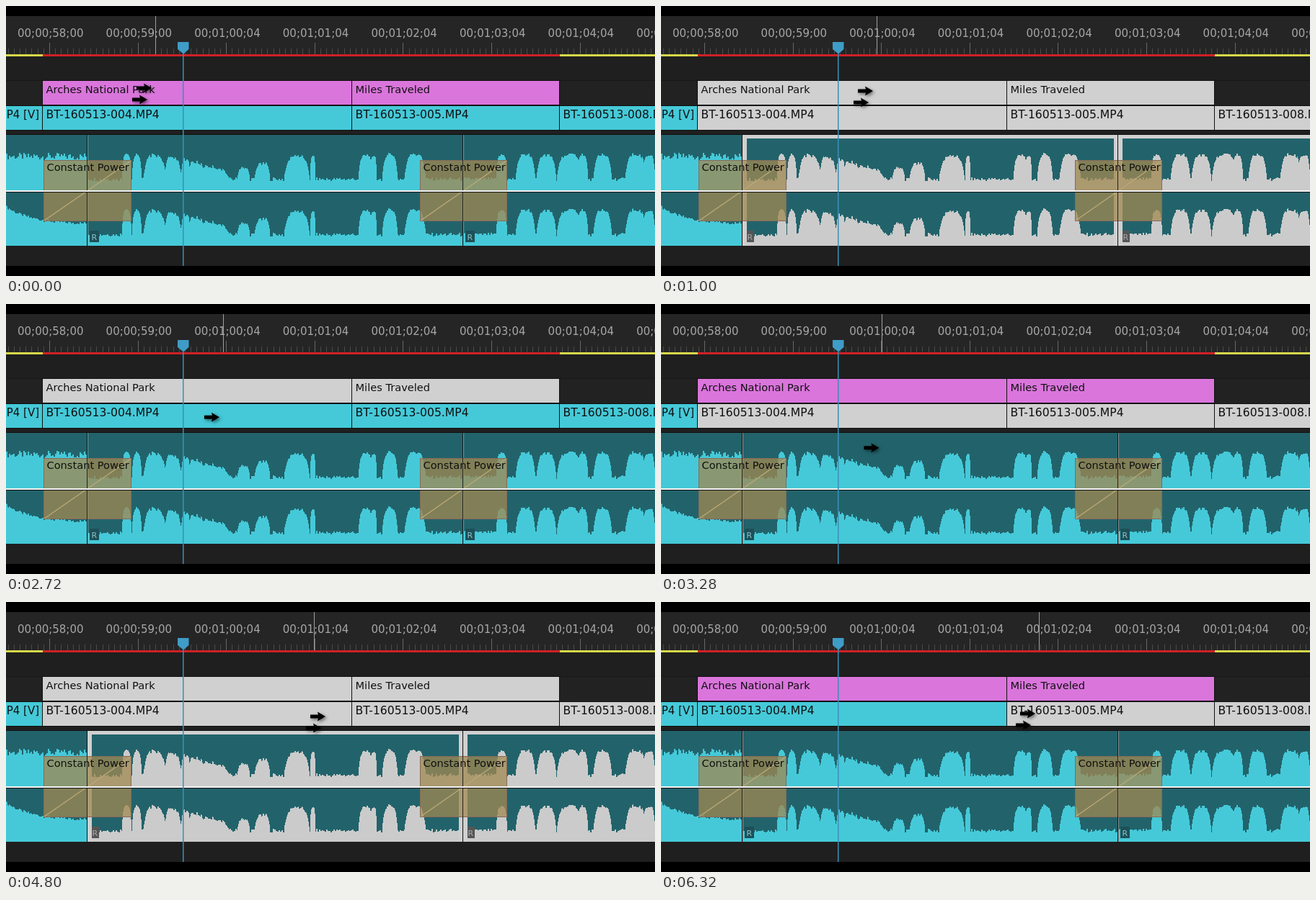
Recreate the animation shown at these times as an HTML page with a canvas. Size 900 px wide and 375 px high, loop 6.4 s.

```html
<!DOCTYPE html>
<html lang="en">
<head>
<meta charset="utf-8">
<title>Track select forward</title>
<style>
  html, body { margin: 0; width: 100%; height: 100%; overflow: hidden; background: #000; }
  canvas { display: block; }
</style>
</head>
<body>
<canvas id="stage" width="900" height="375"></canvas>
<script>
const ctx = document.getElementById('stage').getContext('2d');
const LOOP = 6400, STEP = 40;
const CYAN = '#45c9d8', PINK = '#da75dc', GREY = '#d0d0d0', TEAL = '#22636b', INK = '#101010';

// Pointer moves: start, end, x, y
const moves = [
  [40, 640, 294, 126], [2500, 2740, 296, 158], [3080, 3360, 304, 210],
  [3760, 4280, 359, 179], [4560, 5040, 527, 155], [5600, 5680, 519, 155],
  [6120, 6200, 519, 163]
];

// Clicks select everything from the pointer on, in titles, video or audio
const clicks = [
  [0, ''], [860, 'tva'], [2140, 't'], [2960, 'v'],
  [3480, 'a'], [4520, 'tva'], [5240, 'tva'], [5960, 'v']
];

const titles = [[51, 479, 'Arches National Park'], [480, 767, 'Miles Traveled']];
const videos = [
  [-130, 50, ''], [51, 479, 'BT-160513-004.MP4'],
  [480, 767, 'BT-160513-005.MP4'], [768, 930, 'BT-160513-008.MP4 [V]']
];
const audios = [[0, 112], [113, 633], [634, 900]];

// Loud passages: centre, half width
const bumps = [
  [167, 5], [181, 5], [206, 14], [231, 10], [249, 5], [264, 12], [287, 20],
  [329, 7], [355, 9], [403, 16], [425, 2], [498, 8], [509, 3], [532, 9],
  [567, 13], [687, 6], [720, 12], [749, 12], [781, 16], [799, 6], [827, 11],
  [873, 13], [891, 7]
];

const rect = (x, y, w, h, color) => { ctx.fillStyle = color; ctx.fillRect(x, y, w, h); };

function text(str, x, y, size, color, align = 'left') {
  ctx.font = `${size}px "DejaVu Sans", sans-serif`;
  ctx.textAlign = align;
  ctx.fillStyle = color;
  ctx.fillText(str, x, y);
}

function shape(points, color) {
  ctx.beginPath();
  points.forEach(([x, y]) => ctx.lineTo(x, y));
  ctx.closePath();
  ctx.fillStyle = color;
  ctx.fill();
}

function noise(n) {
  const v = Math.sin(n * 12.9898) * 43758.5453;
  return v - Math.floor(v);
}

// Wave height: a noisy floor with rounded bumps, quieter around x = 310
function level(x, lower) {
  const n = noise(Math.floor(x / 2) + 1);
  if (x < 112) return lower ? 28 + 24 * Math.exp(-x / 35) + n * 4 : 42 + n * 10;
  const floor = 13 + n * 5;
  const peak = 52 - 20 * Math.exp(-(((x - 310) / 60) ** 2)) - n * 5;
  const swell = bumps.map(([c, w]) => 1 - (Math.abs(x - c) / (w + 2)) ** 4);
  return floor + (peak - floor) * Math.max(0, ...swell);
}

function pointer(t) {
  let x = 202, y = 122;
  for (const [from, to, toX, toY] of moves) {
    const u = Math.min(1, Math.max(0, (t - from) / (to - from)));
    const s = u * u * (3 - 2 * u);
    x += (toX - x) * s;
    y += (toY - y) * s;
  }
  return [x, y];
}

function drawRuler(hoverX) {
  rect(0, 14, 900, 53, '#252525');
  for (let i = -8; i < 105; i++) {
    const x = Math.round(60 + i * 122.6 / 15);
    const major = i % 15 === 0;
    rect(x, major ? 51 : 59, 1, major ? 16 : 8, major ? '#666' : '#4a4a4a');
  }
  for (let i = 0; i < 8; i++) {
    const label = i < 2 ? `00;00;${58 + i};00` : `00;01;0${i - 2};04`;
    text(label, 16 + i * 122.6, 43, 15, '#a6a6a6');
  }
  rect(0, 67, 900, 3, '#d6d84a');
  rect(51, 67, 717, 3, '#d02026');
  rect(Math.round(hoverX) - 1, 14, 1, 53, '#a0a0a0');
}

function drawClips(clips, y, color, selected, size) {
  for (const [l, r, name] of clips) {
    rect(l - 1, y - 1, r - l + 2, 35, '#111');
    rect(l, y, r - l, 33, selected(r) ? GREY : color);
    ctx.save();
    ctx.beginPath();
    ctx.rect(l, y, r - l, 33);
    ctx.clip();
    text(name, l + 4.5, y + 17, size, INK);
    ctx.restore();
  }
}

function drawAudioClip(l, r, on) {
  const wave = on ? '#cbcbcb' : CYAN;
  rect(l, 179, r - l, 154, TEAL);
  for (let x = l; x < r; x++) {
    const up = Math.round(level(x, false)), low = Math.round(level(x, true));
    rect(x, 256 - up, 1, up, wave);
    rect(x, 333 - low, 1, low, wave);
  }
  if (on) {
    rect(l, 179, r - l, 5, GREY);
    rect(l, 179, 6, 154, GREY);
    if (r < 900) rect(r - 5, 179, 5, 154, GREY);
  }
  if (l) {
    rect(l - 1, 179, 1, 154, '#111');
    rect(l, 179, 1, 154, on ? GREY : '#819a9d');
    rect(l + (on ? 6 : 3), 312, on ? 10 : 13, 16, on ? '#555' : '#1d5058');
    text('R', l + (on ? 6.5 : 5.5), 324.5, 11, on ? '#aaa' : '#8fc3c9');
  }
}

function drawFade(l, r) {
  rect(l, 214, r - l, 85, 'rgba(160,136,80,.75)');
  ctx.lineWidth = 1;
  ctx.strokeStyle = '#87695a';
  ctx.strokeRect(l + .5, 214.5, r - l - 1, 84);
  ctx.strokeStyle = '#b9a878';
  ctx.lineWidth = 1.5;
  ctx.beginPath();
  ctx.moveTo(l + 1, 298);
  ctx.lineTo(r - 1, 215);
  ctx.stroke();
  text('Constant Power', l + 4.5, 229, 14.6, INK);
}

function drawAudio(selected) {
  rect(0, 178, 900, 155, '#111');
  for (const [l, r] of audios) drawAudioClip(l, r, selected(r));
  drawFade(52, 174);
  drawFade(574, 695);
  for (const [l] of audios.slice(1)) rect(l - 1, 214, 1, 85, '#222');
  rect(0, 256, 900, 2, '#f4f4f4');
  rect(0, 258, 900, 1, '#111');
}

function drawPlayhead() {
  rect(245, 66, 1.5, 295, '#3a8fb7');
  shape([[238, 50], [253.5, 50], [253.5, 60], [246, 66.5], [238, 60]], '#3f9cc7');
}

function drawArrow(x, y) {
  ctx.save();
  ctx.shadowColor = 'rgba(0,0,0,.5)';
  ctx.shadowBlur = 4;
  ctx.shadowOffsetX = ctx.shadowOffsetY = 2;
  shape([[x, y], [x - 11, y - 6.5], [x - 10, y - 2.5], [x - 21, y - 2.5],
         [x - 21, y + 2.5], [x - 10, y + 2.5], [x - 11, y + 6.5]], '#000');
  ctx.restore();
}

function draw(t) {
  const [x, y] = pointer(t);
  const [clickTime, tracks] = clicks.filter(c => c[0] <= t).pop();
  const clickX = pointer(clickTime)[0];
  const picker = track => right => tracks.includes(track) && right > clickX;
  const allTracks = t < 1440 || (t >= 4320 && t < 5400) || t >= 6160;

  rect(0, 0, 900, 375, '#000');
  rect(0, 14, 900, 347, '#1f1f1f');
  rect(0, 103, 900, 1, '#171717');
  rect(0, 104, 900, 34, '#222');
  // The hover line trails the pointer by one step
  drawRuler(pointer(t - STEP)[0] + 6);
  drawClips(titles, 104, PINK, picker('t'), 14.6);
  drawClips(videos, 139, CYAN, picker('v'), 15.6);
  text('MP4 [V]', 46, 156, 15, INK, 'right');
  drawAudio(picker('a'));
  drawPlayhead();
  if (allTracks) {
    drawArrow(x, y - 8);
    drawArrow(x - 6, y + 8);
  } else {
    drawArrow(x, y);
  }
}

const start = performance.now();
function tick() {
  const t = (performance.now() - start) % LOOP;
  draw(Math.floor(t / STEP) * STEP);
  requestAnimationFrame(tick);
}
tick();
</script>
</body>
</html>
```
